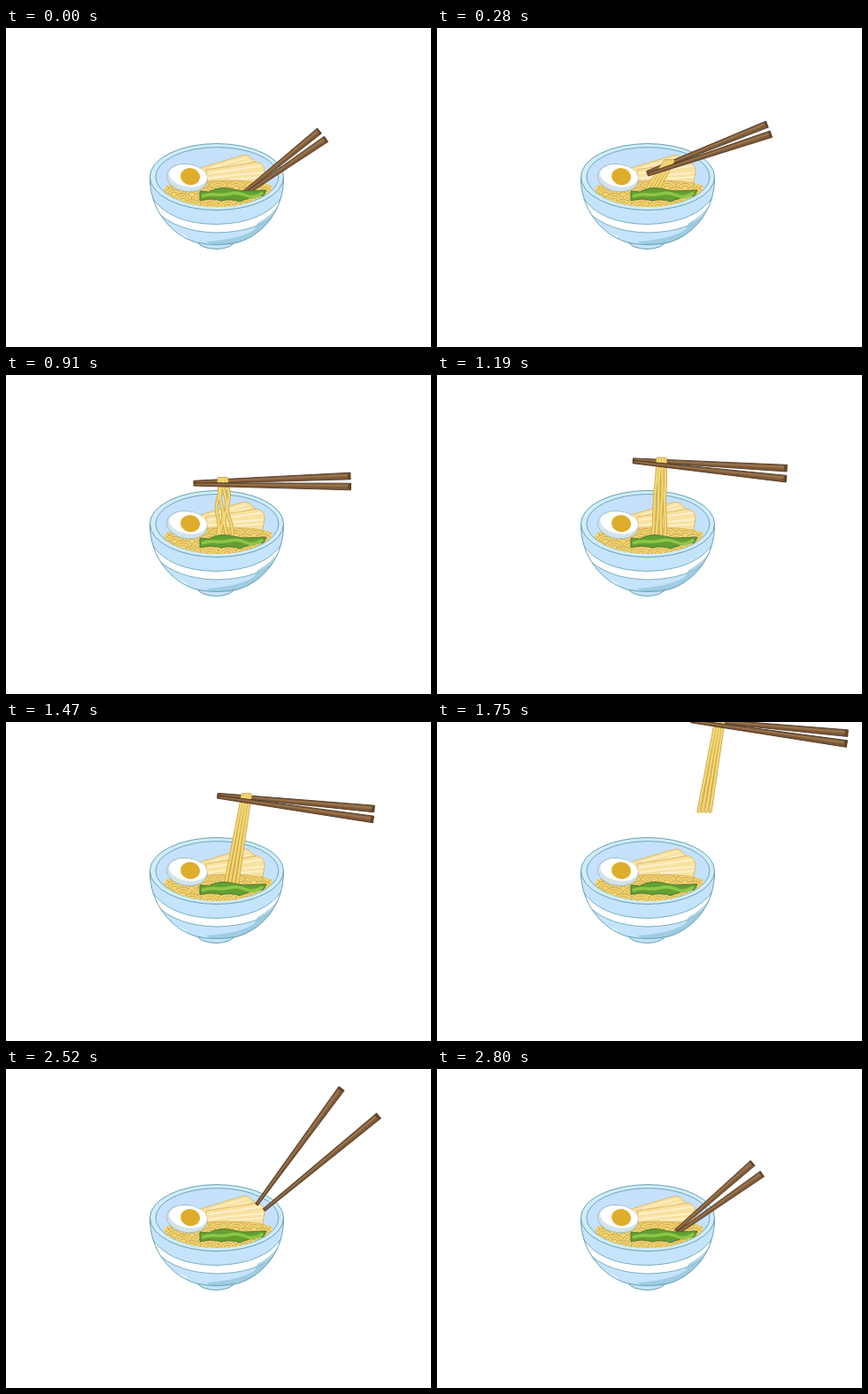
An HTML page for the animation above (2870 ms loop, 480 by 360 pixels).

```html
<!DOCTYPE html>
<html lang="en">
<head>
<meta charset="utf-8">
<title>Noodle bowl</title>
<style>
  html, body { margin: 0; width: 100%; height: 100%; overflow: hidden; background: #fff; }
  svg { display: block; width: 100vw; height: 100vh; }
</style>
</head>
<body>
<svg viewBox="0 0 480 360" fill="none" stroke-width=".9" stroke-linejoin="round">
  <defs>
    <path id="shell" d="M162.500 168C162 205 187 234 215 242Q238 247 262 242C291 233 314 205 313.500 168"/>
    <clipPath id="body"><use href="#shell"/></clipPath>
    <clipPath id="soup"><path d="M178 182Q184 173 200 177L228 172Q264 165 300 178Q302 184 291 189Q268 202 238 202Q205 201 183 188Z"/></clipPath>
    <path id="slab" d="M226 160Q254 156 284 151Q292 154 292 161L290 175Q258 170 227 173Z"/>
    <clipPath id="meat"><use href="#slab"/></clipPath>
    <g id="stick">
      <path d="M0-1.700L177-3.800V3.800L0 1.700Z" fill="#7d5838" stroke="#4f3b27"/>
      <path d="M4-.7L174-2.400V.4L4 .4Z" fill="#98734a"/>
      <path d="M174-3.500H177V3.500H174Z" fill="#634529"/>
    </g>
  </defs>

  <!-- bowl -->
  <path d="M215 240Q219 249 238 249.500Q254 249 260 240Z" fill="#c2e3f8" stroke="#5c98a8"/>
  <g clip-path="url(#body)">
    <path d="M160 160H316V250H160Z" fill="#c5e4fc"/>
    <path d="M164 190Q184 221 238 221.500Q292 220 312 190L304 210Q284 230 238 231Q193 230 170 207Z" fill="#fff" stroke="#6fa9b7"/>
    <path d="M309 198Q300 212 284 220L281 227Q267 238 226 241L240 248L290 234Z" fill="#90c2d9" opacity=".7"/>
    <path d="M172 213Q184 230 204 236" stroke="#e4f5ff" stroke-width="2.500"/>
  </g>
  <use href="#shell" stroke="#5c98a8"/>
  <ellipse cx="238" cy="168" rx="75.500" ry="37.500" fill="#d0ecf9" stroke="#5c98a8"/>
  <ellipse cx="238.500" cy="168" rx="69.500" ry="33.500" fill="#c5e1fd" stroke="#65a0b0"/>

  <!-- fillings -->
  <g clip-path="url(#soup)"><path d="M170 160H310V210H170Z" fill="#e9c866"/><g id="rings" fill="#f2d675" stroke="#cda54a"/></g>
  <path d="M219 158L266 144Q273 142 277 147L283 152L270 162L222 166Z" fill="#f9e1a0" stroke="#d9b766"/>
  <path d="M231 158L272 146M250 157L275 150" stroke="#fdf0c6" stroke-width="1.500"/>
  <use href="#slab" fill="#f9e1a0"/>
  <path d="M227 164Q260 160 291 155M227 170Q260 165 292 163M252 171L291 168" stroke="#fdf1cc" stroke-width="2" clip-path="url(#meat)"/>
  <use href="#slab" stroke="#d9b766"/>
  <g transform="rotate(9 204 168)">
    <ellipse cx="204.500" cy="169" rx="23" ry="15.500" fill="#d3e3e9" stroke="#9dbcc6"/>
    <ellipse cx="205.500" cy="166.500" rx="21.500" ry="12.500" fill="#fff"/>
    <ellipse cx="208" cy="167" rx="11" ry="9.500" fill="#dfad2c"/>
  </g>

  <use id="back" href="#stick"/>
  <g id="strands" stroke-linecap="round">
    <path stroke="#c9a246" stroke-width="4"/>
    <path stroke="#f3d774" stroke-width="2.500"/>
  </g>
  <use id="front" href="#stick"/>

  <path d="M219 184L229 185Q240 179 251 181T268 184L294 183L291 189Q274 191 264 196Q254 192 243 195Q231 191 219 195Z" fill="#62a032" stroke="#4f7130"/>
  <path d="M221 190Q230 187 237 188T253 187T271 189T290 186" stroke="#8dc645" stroke-width="3.500"/>
</svg>
<script>
const FRAME = 70, FRAMES = 41;
const $ = id => document.getElementById(id);

// key poses: upper stick from tip to handle, then the gap between handles
const dip = [268, 186, 354, 116, 12];
const grab = [214, 146, 387, 103, 12];
const lift = [212, 121, 389, 114, 12];
const raise = [217, 99, 390, 107, 12];
const pull = [239, 82, 416, 98, 12];
const open = [283, 153, 379, 22, 52];
const moves = [[0, dip, 490, grab], [490, grab, 910, lift], [910, lift, 1120, raise], [1120, raise, 1470, pull]];

const mix = (a, b, k) => a.map((v, i) => v + (b[i] - v) * k);
const shift = ([x, y, ex, ey, gap], dx, dy) => [x + dx, y + dy, ex + dx, ey + dy, gap];

// speeding up as the noodles leave the bowl
function flight(t) {
  const u = Math.max(0, t - 1470) / 210;
  return [36 * u, -40 * u - 18 * u * u];
}

function poseAt(t) {
  const move = moves.find(([from, , to]) => t >= from && t < to);
  if (move) return mix(move[1], move[3], (t - move[0]) / (move[2] - move[0]));
  if (t < 2100) return shift(pull, ...flight(t));
  if (t < 2520) return shift(open, .214 * (2520 - t), -.407 * (2520 - t));
  return mix(open, dip, 1 - (1 - (t - 2520) / 350) ** 1.4);
}

function placeStick(el, x, y, ex, ey) {
  const angle = Math.atan2(ey - y, ex - x) * 180 / Math.PI;
  const scale = Math.hypot(ex - x, ey - y) / 177;
  el.setAttribute('transform', `translate(${x} ${y}) rotate(${angle}) scale(${scale} 1)`);
}

function strandPaths(gx, gy, bx, by, wave) {
  let d = '';
  for (let i = 0; i < 4; i++) {
    for (let j = 0; j <= 16; j++) {
      const k = j / 16, spacing = 2.8 + k * (1.6 + wave * .6);
      const sway = wave * Math.sin(k * 10 + i * 1.9) * Math.min(1, k * 3);
      const x = gx + (bx - gx) * k + (i - 1.5) * spacing + sway;
      d += `${j ? 'L' : 'M'}${x.toFixed(1)} ${(gy + (by - gy) * k).toFixed(1)}`;
    }
  }
  return d;
}

function draw(t) {
  const [x, y, ex, ey, gap] = poseAt(t);
  const len = Math.hypot(ex - x, ey - y), nx = (y - ey) / len, ny = (ex - x) / len;
  placeStick($('back'), x, y, ex, ey);
  placeStick($('front'), x + nx * gap / 5, y + ny * gap / 5, ex + nx * gap, ey + ny * gap);

  let d = '';
  if (t > 210 && t < 2100) {
    const [dx, dy] = flight(t);
    const baseX = 241 + 13 * Math.min(1, Math.max(0, (t - 490) / 980)) + dx;
    const wave = 1.8 * Math.exp(-(((t - 910) / 240) ** 2));
    d = strandPaths(x + (ex - x) * .185, y + (ey - y) * .185 - 3, baseX, 186 + dy, wave);
  }
  for (const path of $('strands').children) path.setAttribute('d', d);
}

// overlapping noodle loops, back row first
let rings = '';
for (let row = 0; row < 4; row++) {
  for (let x = 180 + row % 2 * 10; x < 308; x += 20) {
    for (const r of [11, 7.5, 4]) {
      rings += `<ellipse cx="${x}" cy="${181 + row * 7}" rx="${r}" ry="${r * .75}"/>`;
    }
  }
}
$('rings').innerHTML = rings;

function tick(now) {
  draw(Math.floor(now / FRAME) % FRAMES * FRAME);
  requestAnimationFrame(tick);
}
tick(performance.now());
</script>
</body>
</html>
```
